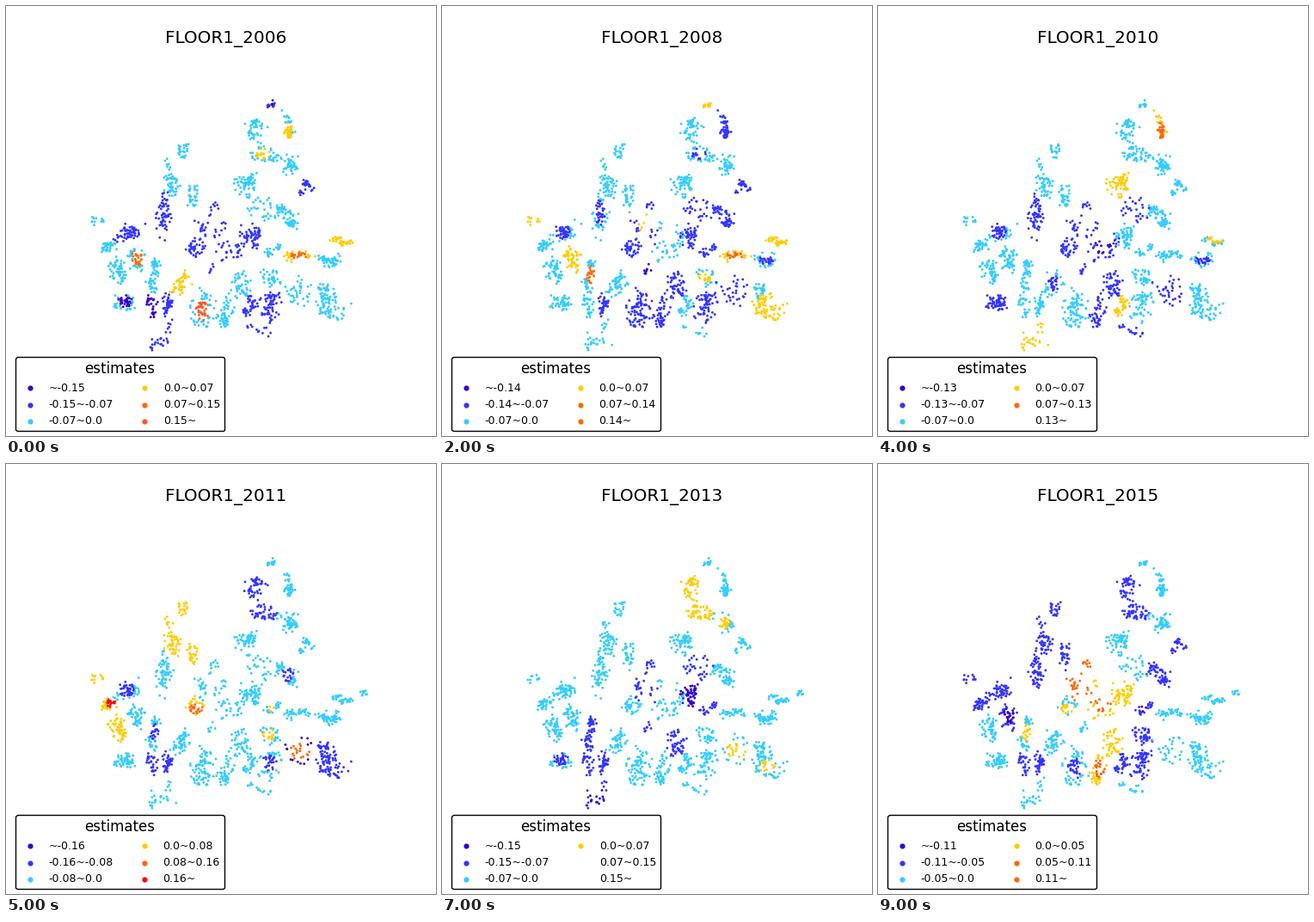
Write a matplotlib script that moves like this. It is 500x500 px and loops after 10000 ms.

```python
import numpy as np
import matplotlib.pyplot as plt
from matplotlib.animation import FuncAnimation

COLORS = dict(cyan="#33ccff", blue="#3333ff", navy="#3300cc", yellow="#ffcc00",
              orange="#ff6600", tomato="#ff5522", red="#ff0000")
RIVER_X = [120, 160, 200, 245, 282, 300, 330, 350, 362, 385]
RIVER_Y = [240, 258, 292, 325, 293, 298, 309, 302, 282, 255]
CORE = 0.55

rng = np.random.default_rng(5)
districts = []


def disc(n):
    """Uniform random points in the unit disc."""
    r, a = np.sqrt(rng.random(n)), rng.random(n) * 2 * np.pi
    return np.column_stack([r * np.cos(a), r * np.sin(a)])


def region(name, density, *ellipses):
    """Fill districts name1, name2, ... (x, y, rx, ry) with loosely clumped points."""
    for i, (x, y, rx, ry) in enumerate(ellipses, 1):
        n = round(np.pi * rx * ry * density)
        hubs = 0.8 * disc(1 + n // 6)
        unit = hubs[rng.integers(len(hubs), size=n)] + rng.normal(0, 0.2, (n, 2))
        xy = unit * (rx, ry) + (x, y)
        dry = np.abs(xy[:, 1] - np.interp(xy[:, 0], RIVER_X, RIVER_Y)) > 4.5
        districts.append((f"{name}{i}", xy[dry], np.hypot(*unit[dry].T)))


region("n", 0.1, (308, 113, 5, 12), (290, 143, 13, 15), (328, 145, 9, 19),
       (298, 172, 18, 11), (328, 184, 13, 14), (347, 211, 10, 10), (281, 206, 15, 16),
       (326, 245, 15, 16), (287, 267, 13, 16), (309, 283, 9, 10), (340, 291, 18, 9))
region("m", 0.075, (203, 163, 8, 14), (193, 200, 13, 22), (184, 240, 11, 28),
       (217, 220, 9, 18), (221, 284, 15, 12))
region("w", 0.1, (106, 246, 8, 12), (140, 262, 18, 16), (123, 278, 12, 12),
       (128, 310, 11, 19), (153, 292, 12, 18), (173, 312, 11, 19), (170, 346, 8, 13),
       (138, 343, 16, 13), (187, 350, 8, 20))
region("s", 0.085, (273, 322, 13, 19), (257, 354, 12, 19), (228, 354, 16, 23),
       (204, 322, 13, 18), (282, 350, 10, 16), (306, 348, 17, 17), (306, 315, 14, 13))
region("e", 0.1, (391, 272, 18, 8), (378, 295, 16, 12), (371, 334, 10, 13),
       (379, 352, 18, 15), (414, 261, 5, 9))
region("c", 0.03, (236, 255, 14, 30), (262, 275, 18, 30), (297, 234, 24, 16),
       (240, 305, 8, 16), (181, 386, 18, 20), (297, 374, 20, 9), (342, 335, 22, 20))

points = np.vstack([xy for _, xy, _ in districts])
radius = np.concatenate([r for _, _, r in districts])
home = np.concatenate([[name] * len(xy) for name, xy, _ in districts])

# Class limits, colour of the top class and coloured districts; * means core only.
# Years without districts mix those of their neighbours.
YEARS = {
    2006: (0.15, 0.07, "tomato", dict(
        blue="n1 n6 n9 m3 m5 c1 c2 c4 w2 w9 s5 s6 c5 c6", navy="n1* w7 w8*",
        yellow="n3* n4* s4 e1 n11", orange="n11* w5*", tomato="s3*")),
    2007: (0.13, 0.07, "orange", None),
    2008: (0.14, 0.07, "orange", dict(
        blue="n3 n6 n8 n9 n10 n4* c1 c3 c7 m3* m5 s1 s2 s3 s6 w2* w9 e2*", navy="c4",
        yellow="n1 n11 w1 w5 e1 e4 c1* s7*", orange="n11* w6*")),
    2009: (0.12, 0.06, "orange", None),
    2010: (0.13, 0.07, None, dict(
        blue="m3 m5 c1 c2 c3 c4 c6 c7 s1 s2 s4* w2* w8 e2*", navy="c2*",
        yellow="n3 n7 c5 e1* s5", orange="n3*")),
    2011: (0.16, 0.08, "red", dict(
        blue="n2 n4 n8* w2* w6* w7 w9 e3 e4 s6*", navy="c7",
        yellow="m1 m2 m4 m5 w1 w3 w4 n10* s7*", orange="m5* c7*", red="w3*")),
    2012: (0.17, 0.09, "red", None),
    2013: (0.15, 0.07, None, dict(
        blue="c1 c3 c4 c5 n10 w6 w7 w8* w9 s1", navy="n9 c5*",
        yellow="n2 n4 n5* c7* e4*")),
    2014: (0.19, 0.1, None, dict(
        blue="w8 w9 c1 c3* c7 m5 s1* s2 e1 e2 e3 e4 e5 n11", navy="w6* w7 w8* w9* c5",
        yellow="n3 n5* n9* s4* s6 w2*")),
    2015: (0.11, 0.05, "orange", dict(
        blue="n2 n4 n6 n8 n10 m1 m2 m3 m4 w1 w2 w3 w5 w7 w9 s3* s5 s6 s7", navy="n10* w5*",
        yellow="n9 s1 s2 c2 m5* w6*", orange="c1 c2* s2*")),
}


def paint(year):
    """Colour name of every point in one year."""
    areas = YEARS[year][3]
    if areas is None:
        names = np.unique(home)
        coin = np.random.default_rng(year).random(len(names)) < 0.5
        return np.where(np.isin(home, names[coin]), paint(year - 1), paint(year + 1))
    result = np.full(len(home), "cyan", dtype="U8")
    for color, names in areas.items():
        for name in names.split():
            reach = CORE if name.endswith("*") else np.inf
            result[(home == name.rstrip("*")) & (radius < reach)] = color
    return result


def present(year):
    keep = np.random.default_rng(year + 1).random(len(points)) < 0.8
    if year < 2009 or year == 2010:
        keep &= home != "e5"
    return keep


fig = plt.figure(figsize=(5, 5), dpi=100, facecolor="white")
ax = fig.add_axes([0, 0, 1, 1])
ax.set(xlim=(0, 500), ylim=(500, 0))
ax.axis("off")
title = ax.text(255.3, 43.4, "", ha="center", va="baseline", fontsize=14.4,
                family="DejaVu Sans")
dots = ax.scatter([], [], s=4.2, linewidths=0)


def draw_legend(high, mid, top, used):
    if ax.get_legend():
        ax.get_legend().remove()
    labels = [f"~-{high}", f"-{high}~-{mid}", f"-{mid}~0.0",
              f"0.0~{mid}", f"{mid}~{high}", f"{high}~"]
    keys = ["navy", "blue", "cyan", "yellow", "orange" if "orange" in used else None, top]
    handles = [ax.scatter([], [], s=20, linewidths=0, color=COLORS.get(k, "none"))
               for k in keys]
    ax.legend(handles, labels, ncol=2, scatterpoints=1, title="estimates", fontsize=9,
              title_fontsize=12, loc="lower left", bbox_to_anchor=(11, 494.2),
              bbox_transform=ax.transData, borderaxespad=0, framealpha=1,
              handlelength=1.92, handletextpad=0.77, columnspacing=1.92,
              facecolor="white", edgecolor="black")
    for h in handles:
        h.remove()


def update(i):
    year = 2006 + i
    high, mid, top, _ = YEARS[year]
    keep, names = present(year), paint(year)
    title.set_text(f"FLOOR1_{year}")
    dots.set_offsets(points[keep])
    dots.set_facecolor([COLORS[n] for n in names[keep]])
    draw_legend(high, mid, top, names)
    return [dots, title]


anim = FuncAnimation(fig, update, frames=len(YEARS), interval=1000, repeat=True,
                     init_func=lambda: update(0), blit=False)
plt.show()
```
